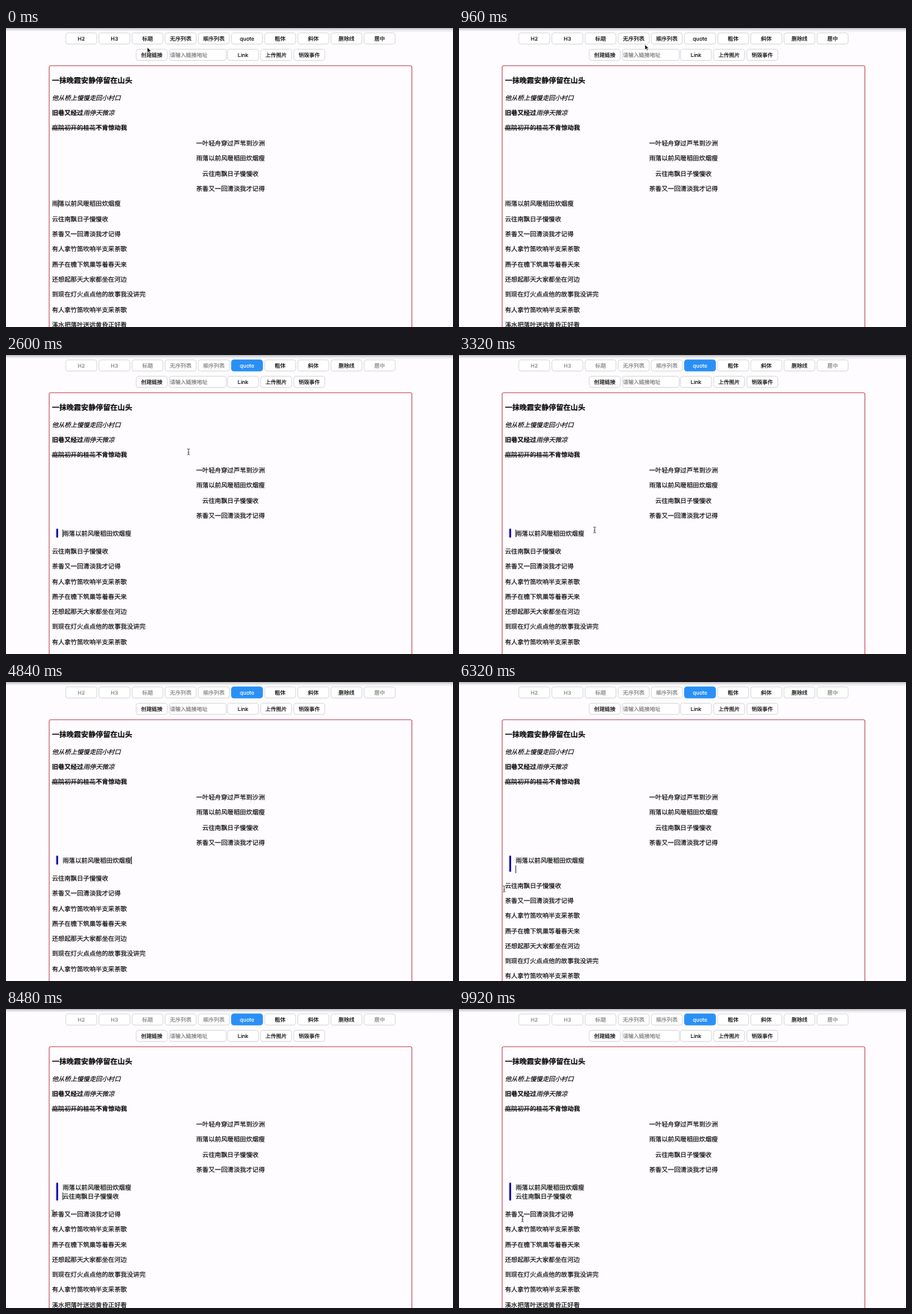
Recreate the animation shown at these times as an HTML page. Size 600x402 px, loop 9.96 s.

```html
<!DOCTYPE html>
<html lang="zh-CN">
<head>
<meta charset="utf-8">
<title>Editor</title>
<style>
  html, body { margin: 0; width: 100%; height: 100%; overflow: hidden; background: #fefcfe; }
  svg { display: block; }
  text {
    font: 8.4px Inter, "Noto Sans CJK SC", sans-serif;
    color: #080808;
    fill: currentColor;
    stroke: currentColor;
    stroke-width: 0.15;
    text-rendering: geometricPrecision;
    white-space: pre;
  }
  .h { font-size: 9.8px; font-weight: bold; }
  .b { font-weight: bold; }
  .i { font-style: italic; }
  .s { text-decoration: line-through; }
  .label { font-size: 7.2px; }
  .mid { text-anchor: middle; }
</style>
</head>
<body>
<svg width="600" height="402">
  <defs>
    <linearGradient id="shade" x2="0" y2="1">
      <stop stop-color="#b4b4b8"/>
      <stop offset=".4" stop-color="#b4b4b8" stop-opacity=".35"/>
      <stop offset="1" stop-color="#b4b4b8" stop-opacity="0"/>
    </linearGradient>
  </defs>
  <path d="M0 0H600V6L360 4H0Z" fill="url(#shade)"/>
  <rect x="58" y="50.8" width="486.8" height="400" rx="2" fill="none" stroke="#c65a69" stroke-width="1.1"/>
  <g id="page"></g>
  <rect id="bar" x="67.4" y="233.6" width="2.6" fill="#1512b4"/>
  <rect id="caret" width="0.9" height="10.4" fill="#222"/>
  <circle id="ring" r="5.3" fill="none" stroke="#c4505c" stroke-width="0.9"/>
  <path id="arrow" d="M0 0V7.2L1.7 5.7L2.8 8.1L4 7.6L2.9 5.3H5.2Z" stroke="#fff" stroke-width=".6"/>
  <path id="hand" d="M-1.2 -3.4Q-.5 -4.3 .1 -3.4L.7 -1.2L3.3 -.5Q4 0 3.7 1.6L3.1 4H-.4L-2.9 1Q-2.7 0 -1.6 .6L-.7 1.2Z" fill="#fff" stroke="#222" stroke-width=".8"/>
  <path id="beam" d="M-1.7 -4Q0 -4 0 -3V3Q0 4 -1.7 4M1.7 -4Q0 -4 0 -3M0 3Q0 4 1.7 4M-.9 .9H.9" fill="none" stroke="#333" stroke-width=".8"/>
</svg>
<script>
const LOOP = 9960, BLINK = 520, RING = 480, FADE = 200;
const STEP = 20.3, CHAR = 8.4, LEFT = 61.7, INDENT = 76;
const INK = [8, 8, 8], DIM = [130, 130, 130], WHITE = [255, 255, 255], BLUE = [42, 144, 246], EDGE = [214, 214, 216];
const $ = id => document.getElementById(id);

function add(tag, attrs, text = '') {
  const el = document.createElementNS('http://www.w3.org/2000/svg', tag);
  for (const k in attrs) el.setAttribute(k, attrs[k]);
  el.textContent = text;
  $('page').append(el);
  return el;
}

// y is the middle of the line
const write = (text, x, y, cls = '', size = CHAR) =>
  add('text', { x, y: y + size * 0.37, class: cls }, text);

const frame = (x, y, width) =>
  add('rect', { x, y, width, height: 15, rx: 3, fill: '#fff', stroke: `rgb(${EDGE})`, 'stroke-width': 0.9 });

const buttons = (labels, x, y) => labels.map((label, i) => ({
  box: frame(x + i * 44.5, y, 41.6),
  text: write(label, x + i * 44.5 + 20.8, y + 7.5, 'label mid', 7.2)
}));

const tools = buttons(['H2', 'H3', '标题', '无序列表', '顺序列表', 'quote', '粗体', '斜体', '删除线', '居中'], 80.2, 6.6);
const quoteTool = tools[5];
const lockedTools = tools.filter((_, i) => i < 5 || i > 8);
buttons(['创建链接'], 174.8, 28.6);
buttons(['Link', '上传图片', '销毁事件'], 297.3, 28.6);
frame(219.3, 28.6, 76.4);
write('请输入链接地址', 220, 36.1, 'label', 7.2).style.color = '#777';

write('一抹晚霞安静停留在山头', LEFT, 70.3, 'h', 9.8);
write('他从桥上慢慢走回小村口', LEFT, 94, 'i');
write('旧巷又经过', LEFT, 114, 'b');
write('雨停天微凉', LEFT + 5 * CHAR, 114, 'i');
write('庭院初开的桂花', LEFT, 134.3, 's');
write('不肯惊动我', LEFT + 7 * CHAR, 134.3, 'b');

const verse = ['雨落以前风暖稻田炊烟瘦', '云往南飘日子慢慢收', '茶香又一回清淡我才记得'];
['一叶轻舟穿过芦苇到沙洲', ...verse].forEach((s, i) => write(s, 301.3, 154.8 + i * STEP, 'mid'));

const lines = [...verse, '有人拿竹笛吹响半支采茶歌', '燕子在檐下筑巢等着春天来',
  '还想起那天大家都坐在河边', '到现在灯火点点他的故事我没讲完',
  '有人拿竹笛吹响半支采茶歌', '溪水把落叶送远黄昏正好看'].map(s => write(s, LEFT, 0));

// quoted: lines inside the block, bar: its height, row and col: the caret
const edits = [
  { from: 0, quoted: 0, bar: 0, row: 0, col: 1 },
  { from: 2240, quoted: 1, bar: 11.8, row: 0, col: 0 },
  { from: 3560, quoted: 1, bar: 11.8, row: 0, col: 11 },
  { from: 5000, quoted: 1, bar: 21.5, row: 1, col: 0, blank: true },
  { from: 6960, quoted: 1, bar: 21.5, row: 1, col: 0 },
  { from: 8280, quoted: 2, bar: 23.8, row: 1, col: 0 }
];
const clicks = [1920, 3840, 6920];
const quoteSwitches = [2240, 7040, 8280];

// pointer stops: time, x, y
const path = [
  [0, 189.6, 26], [1000, 252, 22], [1320, 311, 16], [1960, 311, 16], [2160, 294.3, 47.5],
  [3160, 182.5, 235], [5400, 176, 238], [6160, 58.5, 282], [6480, 62.8, 274.5], [9600, 62.8, 274.5], [LOOP, 88, 283]
];

const clamp = v => Math.max(0, Math.min(1, v));
const mix = (a, b, k) => `rgb(${a.map((v, i) => Math.round(v + (b[i] - v) * k))})`;

function pointer(t) {
  const i = path.findIndex(p => p[0] > t);
  const [t0, x0, y0] = path[i - 1], [t1, x1, y1] = path[i];
  const k = (t - t0) / (t1 - t0);
  return [x0 + (x1 - x0) * k, y0 + (y1 - y0) * k];
}

function place(id, visible, x, y) {
  $(id).style.display = visible ? '' : 'none';
  $(id).setAttribute('transform', `translate(${x} ${y})`);
}

function draw(t) {
  const { from, quoted, bar, row, col, blank } = edits.findLast(e => t >= e.from);
  const next = bar ? 252 + bar : 236.3;
  const left = inside => inside ? INDENT : LEFT;
  const middle = (i, inside) => inside ? 240 + i * 12 : next + (i - quoted) * STEP;

  lines.forEach((el, i) => {
    el.setAttribute('x', left(i < quoted));
    el.setAttribute('y', middle(i, i < quoted) + 3.1);
  });
  $('bar').setAttribute('height', bar);

  const inside = blank || row < quoted;
  const lit = Math.floor((t - from) / BLINK) % 2 === 0;
  place('caret', lit, left(inside) + col * CHAR - 0.3, middle(row, inside) - 5.4);

  const k = quoteSwitches.reduce((sum, s, i) => sum + (-1) ** i * clamp((t - s) / FADE), 0);
  quoteTool.box.setAttribute('fill', mix(WHITE, BLUE, k));
  quoteTool.box.setAttribute('stroke', mix(EDGE, BLUE, k));
  quoteTool.text.style.color = mix(INK, WHITE, k);
  for (const { text } of lockedTools) text.style.color = mix(INK, DIM, k);

  const click = clicks.find(c => t >= c && t < c + RING);
  place('ring', click, ...pointer(click || 0));

  const typing = t >= 4840 && t < 5400;
  const shape = typing ? '' : t < 1080 ? 'arrow' : t < 2240 ? 'hand' : 'beam';
  for (const id of ['arrow', 'hand', 'beam']) place(id, id === shape, ...pointer(t));
}

const start = performance.now();
function tick() {
  draw((performance.now() - start) % LOOP);
  requestAnimationFrame(tick);
}
tick();
</script>
</body>
</html>
```
